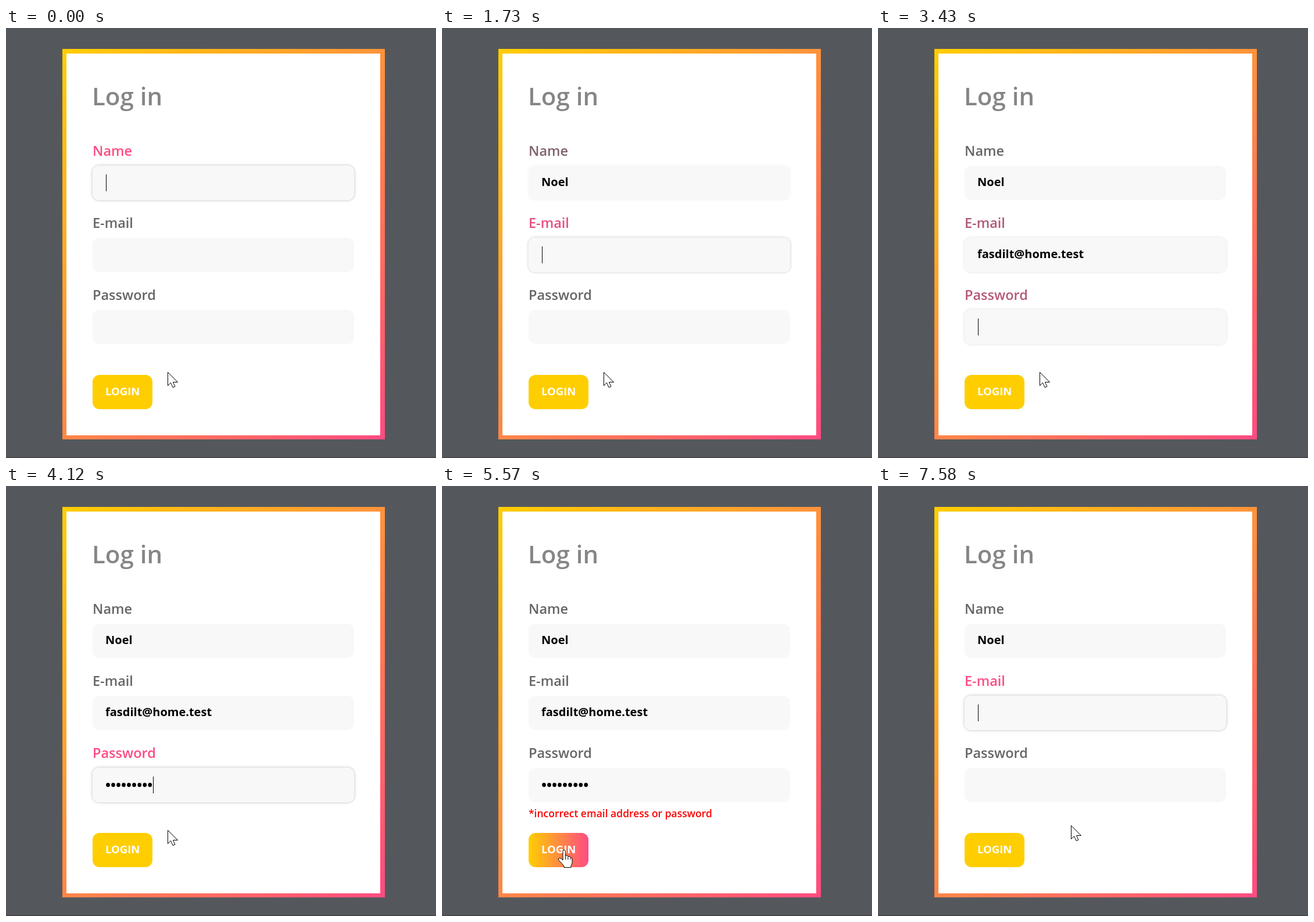
An HTML page that plays this animation: 740x740 px, repeating every 8 s.

```html
<!DOCTYPE html>
<html lang="en">
<head>
<meta charset="utf-8">
<title>Log in</title>
<style>
  html, body { margin: 0; width: 100%; height: 100%; overflow: hidden; background: #54585d; }
  svg { display: block; width: 740px; height: 740px; }
  text { font: 600 23.5px "Open Sans", "Noto Sans", sans-serif; white-space: pre; }
  .title { font-size: 42px; fill: #868686; }
  .value { font-size: 20px; font-weight: 700; fill: #000; }
  .dots { font-size: 24px; }
  .error { font-size: 17.5px; fill: #f00; }
  .login { font-size: 18.5px; font-weight: 700; fill: #fff; }
  .box { fill: #f8f8f8; }
  .ring { filter: drop-shadow(0 0 2px rgba(0, 0, 0, .28)); }
  .cursor path { fill: #fff; stroke: #000; stroke-width: 1; stroke-linejoin: round; }
</style>
</head>
<body>
<svg viewBox="0 0 740 740">
  <defs>
    <linearGradient id="frame" gradientUnits="userSpaceOnUse" x1="67.75" y1="65.25" x2="681.25" y2="678.75">
      <stop stop-color="#ffce00"/><stop offset="1" stop-color="#ff4b82"/>
    </linearGradient>
    <linearGradient id="hover" gradientUnits="userSpaceOnUse" y1="0" y2="0">
      <stop stop-color="#ffce00"/><stop offset="1" stop-color="#ff4b82"/>
    </linearGradient>
  </defs>
  <rect width="740" height="740" fill="#54585d"/>
  <rect y="738" width="740" height="2" fill="#47494c"/>
  <rect x="97" y="36" width="555" height="672" fill="url(#frame)"/>
  <rect x="104" y="44" width="540" height="657" fill="#fff"/>
  <text class="title" x="148" y="133">Log in</text>
  <g id="fields"></g>
  <rect id="caret" width="1" height="29"/>
  <text id="error" class="error" x="149" y="570">*incorrect email address or password</text>
  <rect x="149" y="597" width="103" height="59" rx="12" fill="url(#hover)"/>
  <text class="login" x="171" y="632">LOGIN</text>
  <g id="cursor" class="cursor">
    <path id="arrow" d="M.5 .5V23.5L5.5 18.5L9 26.5L13 25L9.5 17.5H17.5Z"/>
    <path id="hand" d="M-1 18V2.5a2.2 2.2 0 0 1 4.4 0V10q4-1 4.5 1.5q3.7-.7 4.2 1.5q2.9-.2 2.9 3V22q0 3-2 5.500V30.500H1V28Q-4 22-8.500 17.500q-1-3.200 2-3.200q3 .7 5.500 3.700ZM3.400 10V17M7.900 12V17M12 13.500V17"/>
  </g>
</svg>
<script>
const LOOP = 8000, FADE = 400, HOVER = 500;
const TO_EMAIL = 1520, TO_PASSWORD = 3310, SUBMIT = 5140, RESET = 7380;
const GRAY = [101, 101, 104], PINK = [255, 75, 130];
const byId = id => document.getElementById(id);
const clamp = (v, lo = 0, hi = 1) => Math.min(hi, Math.max(lo, v));
const mix = (a, b, k) => a + (b - a) * k;
const show = (el, on) => el.setAttribute("visibility", on ? "visible" : "hidden");

// cubic-bezier(.25, .1, .25, 1)
function ease(x) {
  if (x <= 0 || x >= 1) return clamp(x);
  let lo = 0, hi = 1, s;
  for (let i = 0; i < 20; i++) {
    s = (lo + hi) / 2;
    const bx = .75 * s * (1 - s) + s ** 3;
    if (bx < x) lo = s; else hi = s;
  }
  return .3 * s * (1 - s) ** 2 + 3 * s * s * (1 - s) + s ** 3;
}
const fade = (t, start, length = FADE) => ease((t - start) / length);
const keys = (t, start, step, count) => clamp(Math.floor((t - start) / step) + 1, 0, count);

const fields = [
  { label: "Name", text: "Noel", y: 237,
    focus: t => 1 - fade(t, TO_EMAIL),
    typed: t => keys(t, 930, 100, 4) },
  { label: "E-mail", text: "fasdilt@home.test", y: 361,
    focus: t => t >= RESET ? 1 : fade(t, TO_EMAIL) - fade(t, TO_PASSWORD),
    typed: t => t >= RESET ? 0 : keys(t, 1800, 46, 7) + keys(t, 2410, 1, 1) + keys(t, 2670, 1, 1) + keys(t, 2820, 48, 8) },
  { label: "Password", text: "•".repeat(9), y: 485, style: "dots",
    focus: t => fade(t, TO_PASSWORD) - fade(t, SUBMIT),
    typed: t => t >= RESET ? 0 : keys(t, 3560, 70, 9) }
];

byId("fields").innerHTML = fields.map(({ label, y, style = "" }) => `
  <g>
    <text class="label" x="149" y="${y - 17}">${label}</text>
    <rect class="box ring" x="148.500" y="${y - .5}" width="451" height="60" rx="12"/>
    <rect class="box" x="149" y="${y}" width="450" height="59" rx="12"/>
    <text class="value ${style}" x="171" y="${y + (style ? 38 : 35)}"></text>
  </g>`).join("");
[...byId("fields").children].forEach((g, i) => {
  for (const part of ["label", "ring", "value"]) fields[i][part + "El"] = g.querySelector("." + part);
});

// time, x, y of the pointer tip
const path = [
  [0, 278, 592], [4230, 278, 592], [4410, 209, 626], [6330, 209, 626], [6430, 235, 629],
  [6500, 262, 632], [6570, 405, 654], [6640, 422, 662], [RESET, 422, 662], [RESET, 332, 584], [LOOP, 332, 584]
];
function pointer(t) {
  const i = path.findIndex(p => p[0] > t);
  const [t0, x0, y0] = path[i - 1], [t1, x1, y1] = path[i];
  const k = (t - t0) / (t1 - t0);
  return [Math.round(mix(x0, x1, k)), Math.round(mix(y0, y1, k))];
}

function activeField(t) {
  if (t >= RESET) return fields[1];
  if (t >= SUBMIT) return null;
  return fields[t < TO_EMAIL ? 0 : t < TO_PASSWORD ? 1 : 2];
}

function draw(t) {
  for (const f of fields) {
    const focus = f.focus(t), value = f.text.slice(0, f.typed(t));
    f.labelEl.setAttribute("fill", `rgb(${GRAY.map((c, i) => Math.round(mix(c, PINK[i], focus)))})`);
    f.ringEl.setAttribute("opacity", focus);
    if (f.valueEl.textContent !== value) f.valueEl.textContent = value;
  }

  const active = activeField(t), caret = byId("caret");
  const blinkedOff = (t >= 390 && t < 860) || (t >= 4760 && t < SUBMIT);
  show(caret, active && !blinkedOff);
  if (active) {
    const width = active.valueEl.textContent ? active.valueEl.getComputedTextLength() : 0;
    caret.setAttribute("x", 172 + Math.round(width));
    caret.setAttribute("y", active.y + 15);
  }

  show(byId("error"), t >= SUBMIT && t < RESET);

  const hover = t >= RESET ? 0 : fade(t, 4350, HOVER) - fade(t, 6485, HOVER);
  const left = 149 + 103 * (1 - hover);
  byId("hover").setAttribute("x1", left);
  byId("hover").setAttribute("x2", left + 103);

  const [x, y] = pointer(t), onButton = x < 252;
  byId("cursor").setAttribute("transform", `translate(${x} ${y})`);
  show(byId("arrow"), !onButton);
  show(byId("hand"), onButton);
}

function tick() {
  draw(performance.now() % LOOP);
  requestAnimationFrame(tick);
}
tick();
</script>
</body>
</html>
```
